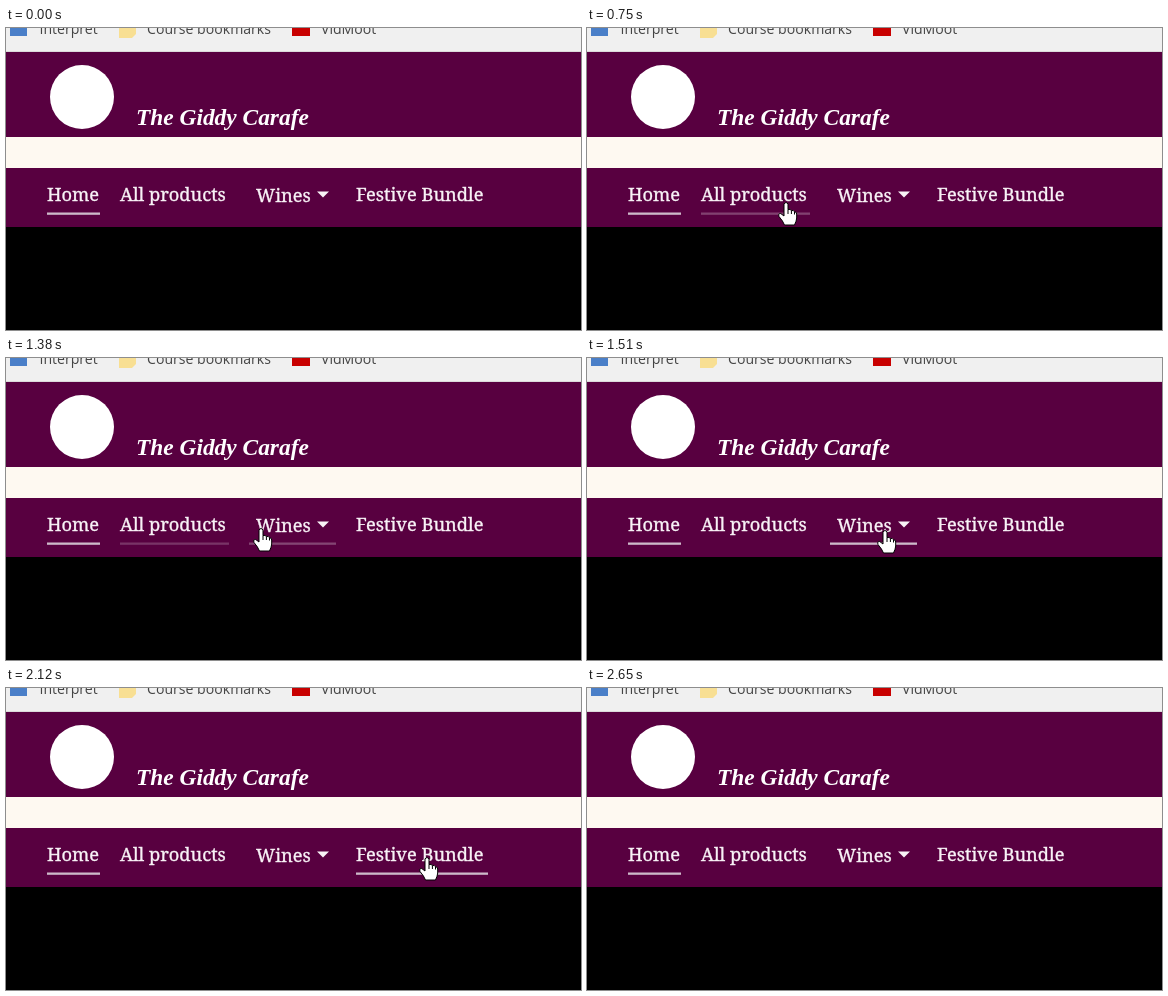
An HTML page that plays this animation: 575x302 px, repeating every 2.98 s.

```html
<!DOCTYPE html>
<html lang="en">
<head>
<meta charset="utf-8">
<title>Wine shop navigation</title>
<style>
  html, body { margin: 0; width: 100%; height: 100%; overflow: hidden; background: #000; }
  svg { display: block; width: 100%; height: 100%; }
  .bookmarks { font: 14.1px "Open Sans", "Noto Sans", sans-serif; fill: #444; }
  .brand { font: italic bold 23.4px "Liberation Serif", serif; fill: #fff; }
  .nav { font: 18.3px "Noto Serif", serif; fill: #f8f2f6; stroke: #f8f2f6; stroke-width: .35px; }
  .line { fill: #cdb9c9; }
  .cursor { fill: #fff; stroke: #000; stroke-width: 1; stroke-linejoin: round; }
</style>
</head>
<body>
<svg viewBox="0 0 575 302">
  <rect width="575" height="24" fill="#f0f0f0"/>
  <rect y="23" width="575" height="1" fill="#dcdadb"/>
  <rect y="24" width="575" height="85" fill="#580040"/>
  <rect y="109" width="575" height="31" fill="#fef9f1"/>
  <rect y="140" width="575" height="59" fill="#580040"/>

  <rect x="4" y="-9" width="17" height="17" fill="#4a7fc8"/>
  <path d="M113-6H130V6L126 10H113Z" fill="#f8df93"/>
  <rect x="286" y="-10" width="18" height="18" fill="#c80000"/>
  <g class="bookmarks">
    <text x="33.5" y="6">Interpret</text>
    <text x="141" y="6">Course bookmarks</text>
    <text x="315" y="6">VidMoot</text>
  </g>

  <circle cx="76" cy="69" r="32" fill="#fff"/>
  <text class="brand" x="130" y="97">The Giddy Carafe</text>

  <g class="nav">
    <text x="41" y="173">Home</text>
    <text x="114" y="173">All products</text>
    <text x="250" y="174">Wines</text>
    <text x="350" y="173">Festive Bundle</text>
  </g>
  <path d="M311 163.5H323L317 169.5Z" fill="#f8f2f6"/>

  <g class="line">
    <rect x="41" y="184.5" width="53" height="2.3"/>
    <rect class="hover" x="114" y="184.5" width="109" height="2.3"/>
    <rect class="hover" x="243" y="184.5" width="87" height="2.3"/>
    <rect class="hover" x="350" y="184.5" width="132" height="2.3"/>
  </g>

  <g id="cursor" class="cursor">
    <path id="arrow" d="M0 0V16L3.7 12.6L6.4 18.4L9 17.3L6.4 11.6H11.3Z"/>
    <g id="hand">
      <path d="M-2 1.8Q0-1 2 1.8V7.6Q4.3 6.6 5.4 8.6Q7.6 7.8 8.5 9.8Q10.7 9.6 10.7 12V16Q10.5 19 8.5 23H-1.5Q-3 19-7 14.5Q-8 11-5.2 11.6L-2 14Z"/>
      <path d="M2 7.6V12M5.4 8.6V12M8.5 9.8V12.5" fill="none"/>
    </g>
  </g>
</svg>
<script>
const LOOP = 2980, FADE = 200;

// Each move: first step time, last step time, pointer tip at every step.
const moves = [
  [260, 750, [[410, 290], [356, 270], [302, 247], [254, 225], [227, 204], [209, 187], [201, 178], [199, 174]]],
  [810, 880, [[199, 174], [199, 174]]],
  [1150, 1650, [[200, 174], [208, 173], [228, 171], [255, 170], [283, 171], [298, 172], [299, 171], [300, 171]]],
  [1720, 2120, [[316, 170], [341, 169], [367, 169], [391, 169], [408, 169], [417, 169], [421, 169]]],
  [2250, 2650, [[422, 171], [429, 176], [444, 188], [464, 216], [484, 249], [502, 284], null]]
];

// Horizontal extent of each link, and when its underline starts to appear and to vanish.
const links = [
  { left: 114, right: 223, on: 680, off: 1220 },
  { left: 243, right: 330, on: 1290, off: 1790 },
  { left: 350, right: 482, on: 1850, off: 2380 }
];

const [cursor, arrow, hand] = ["cursor", "arrow", "hand"].map(id => document.getElementById(id));
const underlines = document.querySelectorAll(".hover");
const clamp = v => Math.max(0, Math.min(1, v));
const show = (node, visible) => node.setAttribute("visibility", visible ? "visible" : "hidden");

function stepAt(time) {
  const move = moves.filter(([start]) => start <= time).pop();
  if (!move) return { time: 0, tip: null };
  const [start, end, tips] = move;
  const last = tips.length - 1;
  const gap = (end - start) / last;
  const index = Math.min(last, Math.floor((time - start) / gap + 1e-6));
  return { time: start + index * gap, tip: tips[index] };
}

function render(now) {
  const { time, tip } = stepAt(now % LOOP);
  links.forEach(({ on, off }, i) => {
    const opacity = clamp((time - on) / FADE) - clamp((time - off) / FADE);
    underlines[i].setAttribute("opacity", opacity);
  });

  const overLink = tip && tip[1] < 187 && links.some(l => tip[0] >= l.left && tip[0] <= l.right);
  show(arrow, tip && !overLink);
  show(hand, overLink);
  if (tip) cursor.setAttribute("transform", `matrix(1 0 0 1 ${tip.join(" ")})`);
}

const origin = performance.now();
function frame() {
  render(performance.now() - origin);
  requestAnimationFrame(frame);
}
frame();
</script>
</body>
</html>
```
